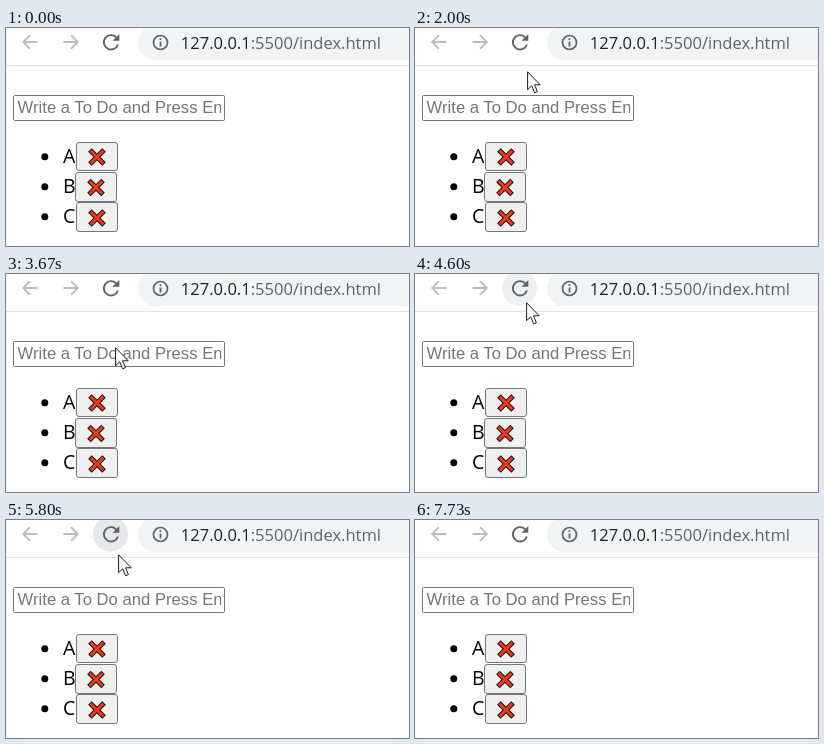
Write an HTML page that moves like this. It is 403 px wide and 218 px high and loops after 8070 ms.

```html
<!DOCTYPE html>
<html lang="en">
<head>
<meta charset="utf-8">
<title>To Do</title>
<style>
  html, body { margin: 0; width: 100%; height: 100%; overflow: hidden; background: #fff; }
  svg { display: block; width: 100%; height: 100%; }
  .url { font: 16.55px "Open Sans", "Noto Sans", sans-serif; }
  .item { font: 19.5px "Open Sans", "Noto Sans", sans-serif; }
  .hint { font: 16.67px "Liberation Sans", Arial, sans-serif; fill: #757575; }
  .button { fill: #efefef; stroke: #767676; }
  .button.hover { fill: #e5e5e5; stroke: #4f4f4f; }
  .field { fill: #fff; stroke: #767676; }
  .field.hover { stroke: #4f4f4f; }
</style>
</head>
<body>
<svg viewBox="0 0 403 218">
  <defs>
    <clipPath id="fieldClip"><rect x="10.75" y="69" width="204.5" height="22"/></clipPath>
    <path id="arrow" d="M15.5 0H1.5M8 -6.8L1.2 0L8 6.8" fill="none" stroke="#babcbe" stroke-width="1.9"/>
    <g id="cross" stroke-linecap="square">
      <path id="bars" d="M-5.3-5.3L5.3 5.3M5.3-5.3L-5.3 5.3" stroke="#111" stroke-width="5"/>
      <path d="M-5.3-5.3L5.3 5.3M5.3-5.3L-5.3 5.3" stroke="#f03a17" stroke-width="3"/>
    </g>
  </defs>

  <path d="M0 37.5H403" stroke="#dee1e6"/>
  <use href="#arrow" x="16" y="14"/>
  <use href="#arrow" transform="translate(73 14) scale(-1 1)"/>
  <circle id="halo" cx="104.5" cy="14" r="17.5" fill="none"/>
  <path d="M111.9 16.5A7.2 7.2 0 1 1 110.1 9.2" fill="none" stroke="#5f6368" stroke-width="1.9"/>
  <path d="M113.3 6v6.8h-6.8z" fill="#5f6368"/>
  <rect x="132" y="-3" width="300" height="35" rx="17.5" fill="#f1f3f4"/>
  <circle cx="154.5" cy="14.5" r="7" fill="none" stroke="#5f6368" stroke-width="1.7"/>
  <path d="M154.5 10.2v1.9M154.5 13.4v5" stroke="#5f6368" stroke-width="1.8"/>
  <text class="url" y="21" x="174.8" fill="#202124">127.0.0.1<tspan fill="#5f6368">:5500/index.html</tspan></text>

  <rect id="field" class="field" x="7.5" y="67.5" width="211" height="25" rx="1"/>
  <text class="hint" x="11.6" y="85" clip-path="url(#fieldClip)">Write a To Do and Press Enter</text>
  <g id="list"></g>

  <path id="cursor" fill="#fff" stroke="#000" stroke-width=".9"
    d="M.6.8V18.6L4.7 14.8L7.6 21.8L10.4 20.6L7.5 13.8H13.2Z"/>
</svg>
<script>
const LOOP = 8070, STEP = 200 / 3;
const $ = id => document.getElementById(id);

const items = ["A", "B", "C"].map((name, i) => ({
  name, x: 70 - i % 2, y: 114 + 30 * i, h: i ? 30 : 29
}));
$("list").innerHTML = items.map(({ name, x, y, h }, i) => `
  <circle cx="38.8" cy="${y + 14.7}" r="3.5"/>
  <text class="item" x="57" y="${y + 21}">${name}</text>
  <rect class="button" x="${x + .5}" y="${y + .5}" width="41" height="${h - 1}" rx="2.5"/>
  <use href="#cross" x="${x + 21}" y="${y + 15 + i / 2}"/>`).join("");
const buttons = document.querySelectorAll(".button");

const home = [116, 17];  // resting place on the reload button
const mix = (a, b, k) => a.map((v, i) => v + (b[i] - v) * k);

// Trips away from the reload button and back
const trips = [
  { from: 2670, to: 3330, far: [100, 57] },
  { from: 3530, to: 4200, far: [96, 173] },
  { from: 4400, to: 5200, far: [106, 39] },
  { from: 5700, to: 6070, far: [109, 47] },
  { from: 6130, to: 6930, far: [91, 27] }
];
const presses = [2400, 4200, 5600];

function pointer(t) {
  if (t >= 200 && t < 330) return [394, 212];
  if (t < 1460 || t >= 7530) return null;
  if (t < 2330) return mix(home, [88, 193], ((2330 - t) / 863) ** 2);
  if (t > 6950) {
    const k = (t - 6950) / 580;
    return [home[0] + 96 * k ** 3, home[1] + 198 * (1 - (1 - k) ** 2)];
  }
  const trip = trips.find(p => t >= p.from && t < p.to);
  if (!trip) return home;
  return mix(home, trip.far, Math.sin(Math.PI * (t - trip.from) / (trip.to - trip.from)) ** 2);
}

const inside = (p, x, y, w, h) => !!p && p[0] >= x && p[0] < x + w && p[1] >= y && p[1] < y + h;

function draw() {
  const t = Math.floor((performance.now() % LOOP + 4) / STEP) * STEP;
  const late = t > 1500 ? pointer(t - STEP) : null;
  const now = t < 1000 || t > 1500 ? pointer(t) : null;
  $("cursor").style.display = now ? "" : "none";
  if (now) $("cursor").setAttribute("transform", `translate(${now.map(Math.round)})`);

  // Hover styles trail the pointer by one step
  items.forEach(({ x, y, h }, i) => buttons[i].classList.toggle("hover", inside(late, x, y, 42, h)));
  $("field").classList.toggle("hover", inside(late, 7, 67, 212, 26));
  const over = late && Math.hypot(late[0] - 104.5, late[1] - 14) < 17;
  const pressed = presses.some(p => t >= p && t < p + 250);
  $("halo").setAttribute("fill", pressed ? "#e7e8ea" : over ? "#eeeff0" : "none");
  requestAnimationFrame(draw);
}
draw();
</script>
</body>
</html>
```
